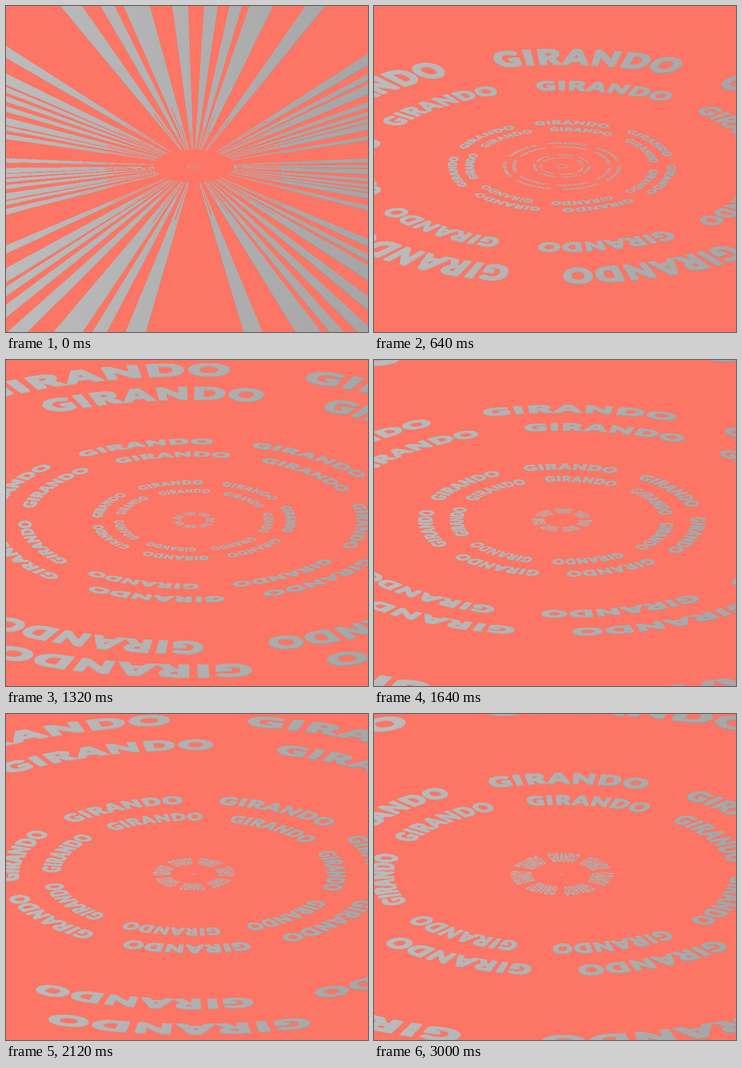
Write an HTML page with a canvas that moves like this. It is 789 px wide and 710 px high and loops after 3.04 s.

```html
<!DOCTYPE html>
<html lang="it">
<head>
<meta charset="utf-8">
<title>Girando</title>
<style>
  html, body { margin: 0; width: 100%; height: 100%; overflow: hidden; background: #fd7564; }
  canvas { display: block; }
</style>
</head>
<body>
<canvas id="stage" width="789" height="710"></canvas>
<script>
const W = 789, H = 710, LOOP = 3040, STEP = 40;
const FPS = 30, FRAMES = 91;
const CX = 409.5, CY = 348.7, TILT = 0.4;
const WORDS = 7, CELL = 360 / WORDS, SPAN = 39.8, TURN = 111.6;
const START_SCALE = 0.0027;
const BG = [253, 117, 100];

// Rings at full scale: inner radius, outer radius, phase in degrees
const RINGS = [
  [0.8, 6, 0], [66, 116, -6.5],
  [377, 431, 0], [494, 552, -7],
  [875, 946, 0], [1050, 1125, -7],
  [1660, 1840, 0], [1985, 2165, -7],
  [3595, 4050, 0], [4800, 5560, -7]
];

// Rays of the outermost ring: from, to (degrees), reach of the inner slit
const RAY_START = 90 / START_SCALE;
const RAYS = [
  [-18.9, -16.1, 3.3], [-13.5, -11.6, 1.9], [-10.2, -6.5, 3.6], [-3.2, -0.9, 2.1],
  [1.5, 3.5, 1.7], [5.2, 7, 2.4], [8.1, 11.5, 3], [16, 18.6, 3]
];

const ctx = document.getElementById('stage').getContext('2d');
const image = ctx.createImageData(W, H);
const out = new Uint32Array(image.data.buffer);

// One word, drawn as text into a cell that is later wrapped around the rings
const MW = 1024, MH = 96;
function wordMask(word) {
  const c = document.createElement('canvas');
  c.width = MW;
  c.height = MH;
  const g = c.getContext('2d', { willReadFrequently: true });
  g.font = '900 100px Lato, Inter, "Open Sans", sans-serif';
  g.lineWidth = 5;
  const gap = 7;
  const widths = [...word].map(ch => g.measureText(ch).width);
  const total = widths.reduce((a, b) => a + b + gap, -gap);
  const box = g.measureText('O');
  const top = box.actualBoundingBoxAscent + 2;
  const tall = top + box.actualBoundingBoxDescent + 2;
  const wide = MW * SPAN / CELL;
  g.translate((MW - wide) / 2, 0);
  g.scale(wide / total, MH / tall);
  let x = 0;
  [...word].forEach((ch, i) => {
    g.fillText(ch, x, top);
    g.strokeText(ch, x, top);
    x += widths[i] + gap;
  });
  const px = g.getImageData(0, 0, MW, MH).data;
  return Uint8Array.from({ length: MW * MH }, (_, i) => px[i * 4 + 3]);
}
const mask = wordMask('GIRANDO');

// For each angle in a cell, the relative radius where the ray becomes solid
const rayFrom = Float32Array.from({ length: MW }, (_, x) => {
  const deg = (x / MW - 0.5) * CELL;
  const ray = RAYS.find(([a, b]) => deg >= a && deg <= b);
  if (!ray) return 1e9;
  const [a, b, reach] = ray;
  const f = (deg - a) / (b - a);
  const wideRay = b - a > 3;
  const slit = wideRay ? Math.abs(Math.abs(f - 0.5) - 0.18) < 0.07 : Math.abs(f - 0.5) < 0.13;
  if (!slit) return 1;
  return wideRay && f > 0.5 ? reach * 0.7 : reach;
});

// Which ring covers each radius, and which row of the word
const FINE = 4, MAX_R = 1040, RAY_RING = RINGS.length;
const ringAt = new Int8Array(MAX_R * FINE), rowAt = new Int16Array(MAX_R * FINE);
const shift = new Float32Array(RAY_RING + 1);
let scale = 1, squash = 1;

function layOut(p) {
  const e = p * p * (3 - 2 * p);
  scale = START_SCALE + (1 - START_SCALE) * e;
  // The disc sways a little, once per loop
  squash = 1.005 - 0.028 * Math.cos(2 * Math.PI * (p - 0.43));
  ringAt.fill(-1);
  RINGS.forEach(([r0, r1, phase], n) => {
    shift[n] = 20.5 - (phase + TURN * e) / CELL;
    const from = Math.ceil(r0 * scale * FINE);
    const to = Math.min(MAX_R * FINE - 1, Math.floor(r1 * scale * FINE));
    for (let k = from; k <= to; k++) {
      const v = (k / FINE / scale - r0) / (r1 - r0);
      ringAt[k] = n;
      rowAt[k] = Math.max(0, Math.min(MH - 1, Math.floor((1 - v) * MH)));
    }
  });
  shift[RAY_RING] = 20.5 - TURN * e / CELL;
  const edge = Math.floor(RAY_START * scale * FINE);
  if (edge < MAX_R * FINE) ringAt.fill(RAY_RING, edge);
}

// Opacity of the lettering at a point of the stage
function cover(x, y) {
  const dx = (x + 0.5 - CX) * squash, dy = (y + 0.5 - CY) / TILT;
  const r = Math.sqrt(dx * dx + dy * dy), k = (r * FINE) | 0, n = ringAt[k];
  if (n < 0) return 0;
  const u = Math.atan2(dx, -dy) / (2 * Math.PI) * WORDS + shift[n];
  const col = ((u - Math.floor(u)) * MW) | 0;
  if (n === RAY_RING) return r / (RAY_START * scale) >= rayFrom[col] ? 255 : 0;
  return mask[rowAt[k] * MW + col];
}

function blend(gray, alpha) {
  const a = alpha / 255;
  const mix = c => Math.round(c + (gray - c) * a);
  return (255 << 24 | mix(BG[2]) << 16 | mix(BG[1]) << 8 | mix(BG[0])) >>> 0;
}

// Light falls from the left; the thin lower sides are darker on the right
const SHADES = 32;
const faces = [], sides = [];
for (let s = 0; s < SHADES; s++) {
  const f = s / (SHADES - 1);
  const ramp = gray => Uint32Array.from({ length: 256 }, (_, a) => blend(gray, a));
  faces.push(ramp(187 - 21 * f));
  sides.push(ramp(180 - 28 * f));
}
const plain = blend(0, 0);

function draw(t) {
  layOut(Math.floor(t * FPS / 1000) / FRAMES);
  for (let y = 0, i = 0; y < H; y++) {
    for (let x = 0; x < W; x++, i++) {
      const shade = (x * SHADES / W) | 0;
      const a = cover(x, y);
      if (a > 127) {
        out[i] = faces[shade][a];
        continue;
      }
      const reach = Math.max(Math.abs(x - CX), Math.abs(y - CY) / TILT);
      const depth = Math.min(2, (reach / 190) | 0);
      const side = depth ? cover(x, y - depth) : 0;
      out[i] = side > a ? sides[shade][side] : a ? faces[shade][a] : plain;
    }
  }
  ctx.putImageData(image, 0, 0);
}

const start = performance.now();
let shown = -1;
function tick() {
  const t = Math.floor((performance.now() - start) % LOOP / STEP) * STEP;
  if (t !== shown) draw(shown = t);
  requestAnimationFrame(tick);
}
tick();
</script>
</body>
</html>
```
